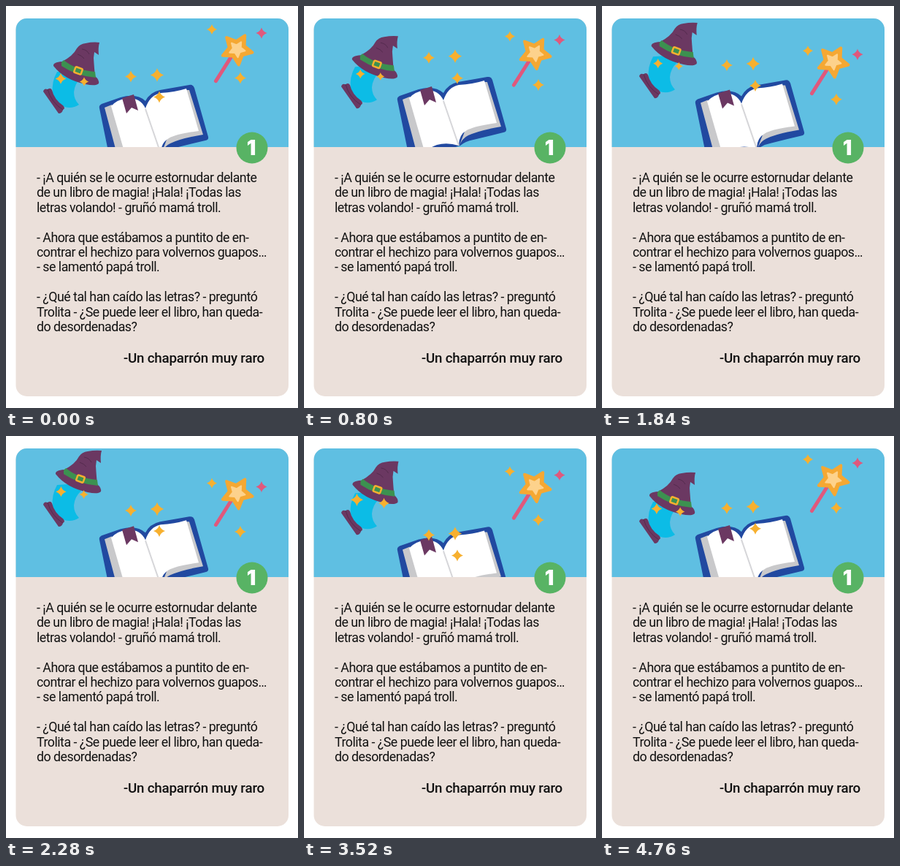
An HTML page for the animation above (4800 ms loop, 400 by 550 pixels).

```html
<!DOCTYPE html>
<html lang="es">
<head>
<meta charset="utf-8">
<style>
  html, body { margin: 0; width: 100%; height: 100%; overflow: hidden; background: #fff; }
  svg { display: block; }
  text { font-family: Roboto, sans-serif; font-size: 17.8px; letter-spacing: -.5px; fill: #111; white-space: pre; }
  .title { font-size: 18.8px; font-weight: 500; letter-spacing: -.2px; text-anchor: end; }
  .number { font: 900 28px Inter, sans-serif; letter-spacing: 0; fill: #fff; text-anchor: middle; }
  .plum { fill: #6b3862; }
  .gold { fill: #f7b02f; }
  .pink { fill: #e0587c; }
</style>
</head>
<body>
<svg width="400" height="550" viewBox="0 0 400 550">
  <defs>
    <clipPath id="card"><rect x="13.5" y="17" width="373.5" height="517" rx="15"/></clipPath>
    <clipPath id="sky"><rect x="13" y="17" width="374" height="176"/></clipPath>
    <path id="spark" d="M0-8Q1.8-2.2 8 0Q1.8 2.2 0 8Q-1.8 2.2-8 0Q-1.8-2.2 0-8Z"/>
  </defs>

  <g clip-path="url(#card)">
    <rect width="400" height="550" fill="#ebe0da"/>
    <rect width="400" height="193" fill="#5fbfe2"/>
  </g>

  <g clip-path="url(#sky)">
    <g id="ball">
      <path fill="#0cbce6" d="M70 90Q62 104 64 119Q68 132 80 138Q91 141 100 135Q93 128 93 118Q94 106 103 98L98 88Z"/>
      <path class="plum" d="M51 117Q52 112 57 114Q61 111 63 115Q66 128 78 136Q82 140 78 142Q77 147 72 147Z"/>
      <path fill="none" stroke="#542b4e" d="M57 114Q62 132 78 142"/>
    </g>

    <g id="hat">
      <path class="plum" d="M65 82Q64 77 77 76Q92 68 97 58Q101 52 109 51Q119 49 128 50Q126 57 127 67L121 63L120 71Q121 87 122 96Q128 101 127 106Q123 110 109 107Q80 101 65 82Z"/>
      <path fill="#3c9150" d="M76 77L79 74Q96 88 122 90L123 98Q97 96 76 82Z"/>
      <path fill="none" stroke="#542b4e" d="M104 59Q111 60 114 66M98 66Q104 68 107 72"/>
      <rect x="-5" y="-4" width="10" height="8" rx="1.5" fill="#3c9150" stroke="#f7b02f" stroke-width="2.5" transform="translate(99 88.5) rotate(20)"/>
    </g>

    <g id="hatSparks" class="gold">
      <use href="#spark" transform="translate(-16 -2) scale(.92)"/>
      <use href="#spark" transform="translate(16 2) scale(.78)"/>
    </g>

    <g id="book">
      <path fill="#2149a0" d="M128 139Q127 135 131 133L157 124Q179 118 191 129Q197 117 211 114L251 107Q256 106 258 111L277 178Q278 182 273 183L232 193Q221 195 214 201L145 222Z"/>
      <path fill="#c9c9cb" d="M135 138L145 134L168 215L155 213ZM246 114L251 114L270 175Q240 180 225 187Q216 191 212 203Z"/>
      <path fill="#fff" d="M144 136Q152 127 166 125Q184 124 191 139L212 201Q196 196 182 200Q170 204 166 212Z"/>
      <path fill="#fff" d="M191 139Q197 121 212 118Q231 117 247 112L264 170Q233 174 223 180Q212 186 212 201Z"/>
      <path fill="none" stroke="#d6d6d9" stroke-width="2" d="M191 140L212 201"/>
      <path class="plum" d="M159 125L175 120L181 142L172 138L165 146Z"/>
    </g>

    <g id="bookSparks" class="gold">
      <use href="#spark" x="171" y="98"/>
      <use href="#spark" transform="translate(207 96) scale(1.15)"/>
      <use href="#spark" x="210" y="126"/>
    </g>

    <g id="wand">
      <path stroke="#e0587c" stroke-width="5" stroke-linecap="round" d="M310 67L287.5 102.5"/>
      <g transform="translate(316.5 59) rotate(30)" stroke-linejoin="round" stroke-width="4">
        <path id="star" fill="#f5a833" stroke="#f5a833"/>
        <path id="core" fill="#fdd28c" stroke="#fdd28c" transform="scale(.52)"/>
      </g>
    </g>

    <g id="wandSparks">
      <use href="#spark" class="gold" transform="translate(282 32) scale(.88)"/>
      <use href="#spark" class="pink" transform="translate(350 37) scale(.95)"/>
      <use href="#spark" class="gold" x="321" y="98.5"/>
    </g>
  </g>

  <circle cx="337" cy="194" r="21.5" fill="#58b364"/>
  <text class="number" x="336" y="204">1</text>
  <g id="story"></g>
  <text class="title" x="354" y="488">-Un chaparrón muy raro</text>
</svg>

<script>
const LOOP = 4800;
const get = id => document.getElementById(id);

const lines = [
  "- ¡A quién se le ocurre estornudar delante",
  "de un libro de magia! ¡Hala! ¡Todas las",
  "letras volando! - gruñó mamá troll.",
  "",
  "- Ahora que estábamos a puntito de en-",
  "contrar el hechizo para volvernos guapos…",
  "- se lamentó papá troll.",
  "",
  "- ¿Qué tal han caído las letras? - preguntó",
  "Trolita - ¿Se puede leer el libro, han queda-",
  "do desordenadas?"
];
get("story").innerHTML = lines
  .map((line, i) => `<text x="42" y="${241 + i * 20.4}">${line}</text>`).join("");

const starPoints = Array.from({ length: 10 }, (_, i) => {
  const angle = i * Math.PI / 5, radius = i % 2 ? 11 : 21.5;
  return `${radius * Math.sin(angle)} ${-radius * Math.cos(angle)}`;
});
for (const id of ["star", "core"]) get(id).setAttribute("d", `M${starPoints.join("L")}Z`);

const wave = time => Math.sin(2 * Math.PI * time / LOOP);
const move = (id, x, y, scale = 1) =>
  get(id).setAttribute("transform", `translate(${x} ${y}) scale(${scale})`);

function draw(time) {
  const lift = 1 - wave(time + 70 + LOOP / 4);
  move("ball", 0, -11.5 * lift);
  move("hat", 1.5 * lift, -15 * lift);
  move("hatSparks", 91, 101.5 - 11.7 * lift, 1 - 0.16 * wave(time));
  move("wand", 0, 9.5 * lift);
  move("wandSparks", 0, 16.3 * lift);

  // A sine with steeper flanks for the floating book
  const s = wave(time + 110), bob = s * (1.25 - 0.25 * s * s);
  move("book", 0, 3.5 - 14 * bob);
  move("bookSparks", 0, 4.5 - 33 * bob);
}

const start = performance.now();
function tick() {
  draw((performance.now() - start) % LOOP);
  requestAnimationFrame(tick);
}
tick();
</script>
</body>
</html>
```
